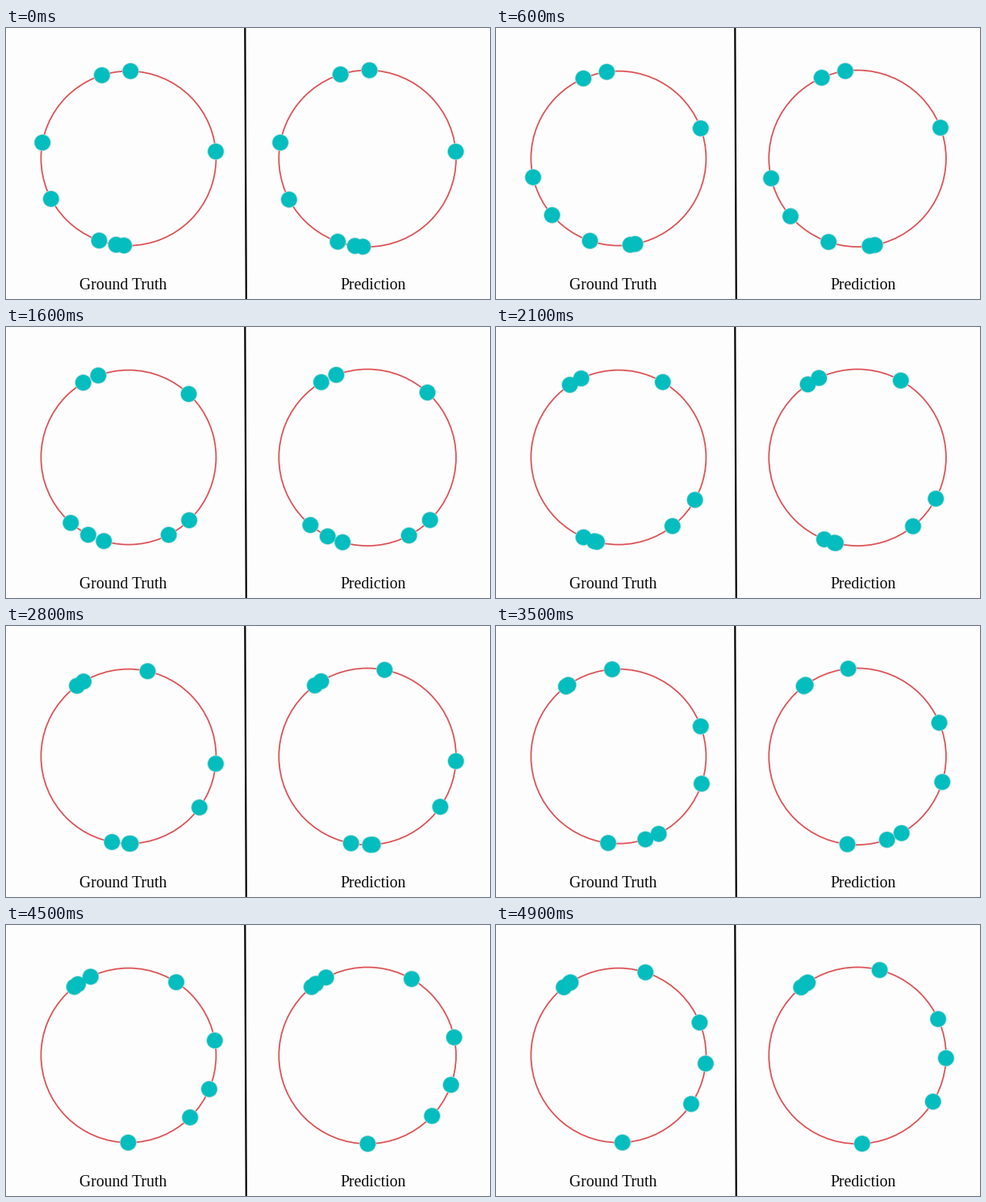
A matplotlib script that plays this animation: 600 px wide and 337 px high, repeating every 5 s.

```python
import numpy as np
import matplotlib.pyplot as plt
from matplotlib.animation import FuncAnimation
from matplotlib.patches import Circle

WIDTH, HEIGHT, DPI = 600, 337, 100
FRAMES, INTERVAL = 50, 100
PX = 72 / DPI  # points per pixel
TEAL, HALO, RED = "#03bdbe", "#a9dedd", "#dc5054"
PREDICTED_PACE = 1.02  # the prediction runs slightly ahead

# Launch of each bead: start angle, then the t, t^2 and t^3 terms (degrees, seconds).
LAUNCHES = [
    (107.7, 10.9, -1.55, 0),
    (88.7, 16.0, -1.6, 0),
    (4.5, 25.7, 0.68, -0.2),
    (261.9, 31.4, 0.68, 0),
    (267.0, 17.4, 0.85, 0.08),
    (250.4, 0.2, 1.25, -0.075),
    (207.7, 21.4, 0.1, 0.095),
    (169.6, 39.3, -2.03, 0.35),
]


def bead_angles(seconds, pace):
    start, *terms = np.transpose(LAUNCHES)
    travel = sum(term * seconds ** power for power, term in enumerate(terms, 1))
    return np.radians(start + pace * travel)


class Ring:
    """A circular track with beads sliding along it."""

    def __init__(self, ax, center, radius, pace):
        self.center, self.radius, self.pace = center, radius, pace
        ax.add_patch(Circle(center, radius, fill=False, ec=RED, lw=1.75 * PX))
        self.halos = self.add_discs(ax, 10.5, HALO, 2)
        self.beads = self.add_discs(ax, 9.7, TEAL, 3)

    def add_discs(self, ax, radius, color, zorder):
        return [ax.add_patch(Circle(self.center, radius, fc=color, ec="none",
                                    zorder=zorder)) for _ in LAUNCHES]

    def update(self, seconds):
        angles = bead_angles(seconds, self.pace)
        xs = self.center[0] + self.radius * np.cos(angles)
        ys = self.center[1] - self.radius * np.sin(angles)
        for bead, halo, x, y in zip(self.beads, self.halos, xs, ys):
            bead.center = halo.center = (x, y)
        return self.beads + self.halos


def caption(ax, x, text):
    ax.text(x, 325, text, family="Liberation Serif", size=19.8 * PX,
            color="#0a0a0a", ha="center", va="baseline")


fig = plt.figure(figsize=(WIDTH / DPI, HEIGHT / DPI), dpi=DPI, facecolor="#fdfdfd")
ax = fig.add_axes([0, 0, 1, 1])
ax.set(xlim=(0, WIDTH), ylim=(HEIGHT, 0))
ax.axis("off")

ax.plot([296.3, 297.8], [-2, HEIGHT + 2], color="black", lw=2.2 * PX)
caption(ax, 145, "Ground Truth")
caption(ax, 455, "Prediction")

rings = [
    Ring(ax, (151.9, 162.1), 108.5, 1),
    Ring(ax, (448.1, 162.3), 109.8, PREDICTED_PACE),
]


def draw(frame):
    seconds = frame * INTERVAL / 1000
    return [artist for ring in rings for artist in ring.update(seconds)]


anim = FuncAnimation(fig, draw, frames=FRAMES, interval=INTERVAL,
                     repeat=True, repeat_delay=0)
plt.show()
```
